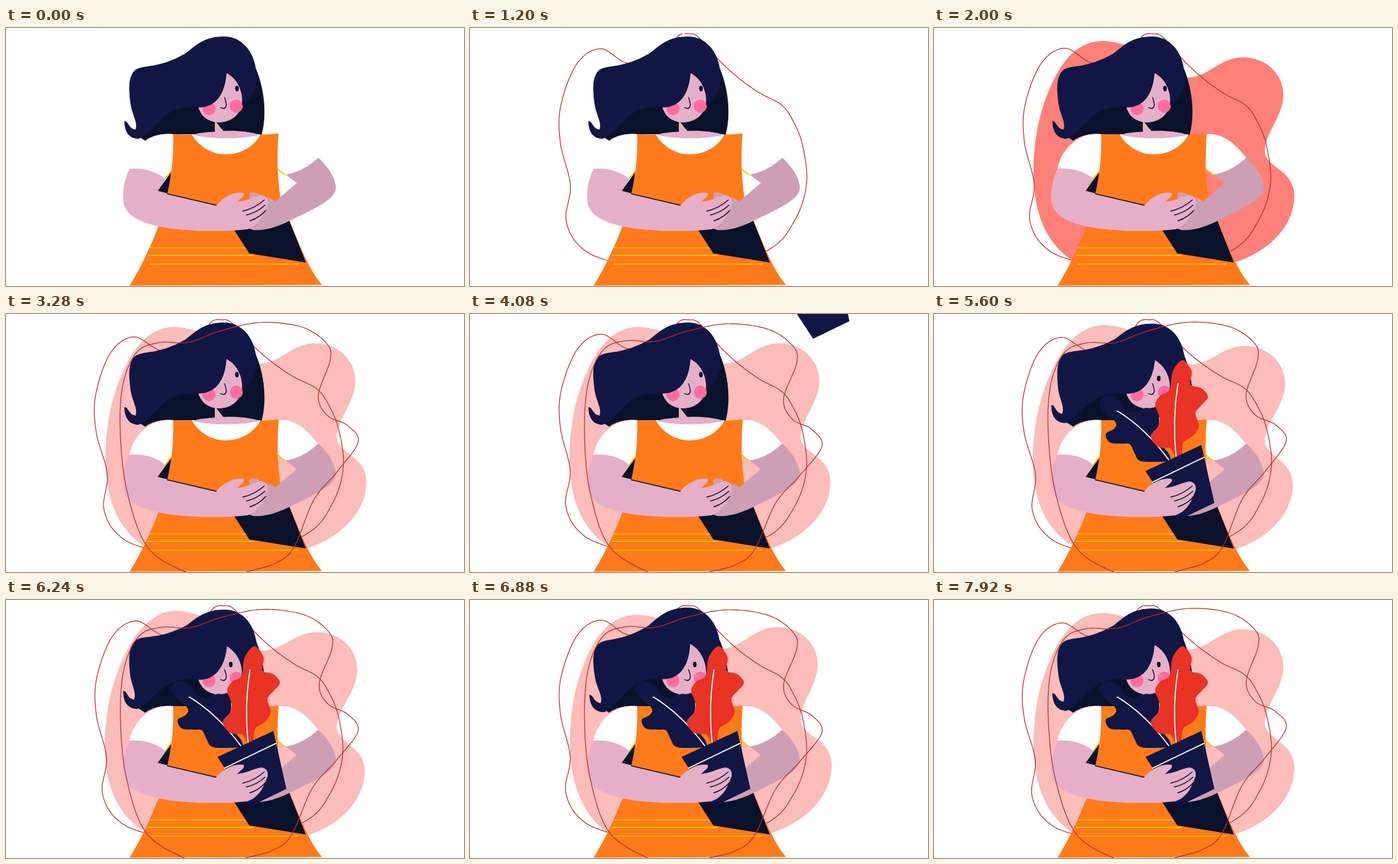
Recreate the animation shown at these times as an HTML page with a canvas. Size 704 px wide and 396 px high, loop 8 s.

```html
<!DOCTYPE html>
<html lang="en">
<head>
<meta charset="utf-8">
<title>Woman with a plant</title>
<style>
html, body { margin: 0; width: 100%; height: 100%; overflow: hidden; background: #fff; }
canvas { display: block; width: 704px; height: 396px; }
</style>
</head>
<body>
<canvas id="stage" width="704" height="396"></canvas>
<script>
const ctx = document.getElementById('stage').getContext('2d');
const LOOP = 8000, STEP = 80, TAU = Math.PI * 2;
const NAVY = '#121645', DARK = '#0a112a', ORANGE = '#ff7a1a', YELLOW = '#ffc400';
const SKIN = '#e6afc8', SHADE = '#cd9fb4', PINK = '#ff6b9f', RED = '#e83325', LINE = '#b5302a';

// Closed Catmull-Rom curve through a few key points, as a polyline.
function smooth(keys) {
  const pts = keys.split(' ').map(p => p.split(',').map(Number));
  const n = pts.length, out = [];
  for (let i = 0; i < n; i++) {
    const [a, b, c, d] = [-1, 0, 1, 2].map(k => pts[(i + k + n) % n]);
    for (let u = 0; u < 1; u += 1 / 16) {
      out.push([0, 1].map(k => b[k] + u / 2 * (c[k] - a[k]
        + u * (2 * a[k] - 5 * b[k] + 4 * c[k] - d[k] + u * (3 * (b[k] - c[k]) + d[k] - a[k])))));
    }
  }
  return [...out, pts[0]];
}

function trace(pts, path = new Path2D()) {
  pts.forEach(([x, y], i) => i ? path.lineTo(x, y) : path.moveTo(x, y));
  return path;
}

const shape = d => new Path2D(d);
const blob = shape('M262 20C226 18 199 45 180 88C160 132 152 180 153 230C155 290 175 332 213 357L300 372L461 360C503 348 553 312 554 258C554 222 520 216 510 197C501 170 537 138 537 103C537 70 510 45 475 45C440 45 425 73 393 76C360 75 330 25 262 20Z');
const outer = smooth('335,385 213,357 167,333 147,293 154,240 139,175 140,118 165,54 202,31 246,54 300,38 321,12 337,9 352,14 383,49 412,76 445,100 478,118 495,140 511,180 517,240 498,297 455,343');
const inner = smooth('320,409 273,396 213,355 184,270 176,180 182,105 205,55 240,41 285,42 335,26 397,15 460,24 497,50 502,76 482,130 495,161 525,177 541,203 507,248 470,290 437,362 408,385 368,396');
const redLeaf = trace(smooth('372,223 364,207 345,204 333,188 343,175 347,160 340,140 347,126 362,116 367,88 382,71 396,88 394,108 411,114 421,127 411,140 402,152 407,172 398,187 383,198 380,220'));
const navyLeaf = trace(smooth('254,135 267,125 284,132 296,148 312,149 328,144 344,153 345,172 335,185 341,199 356,208 363,224 338,227 316,225 308,213 301,200 288,199 270,197 264,184 277,176 279,166 262,150'));
const pot = shape('M325 241L411 201L431 290L375 317Z');

const backHair = shape('M203 166L214 173C226 164 240 162 257 163L393 164C401 135 398 95 384 62L300 60L230 130Z');
const face = shape('M339 66C354 77 363 93 363 112C362 131 348 145 326 145C310 144 299 135 295 120L320 85Z');
const hair = shape('M339 69C337 98 325 122 296 122C264 119 250 130 238 141C226 153 214 166 204 170C190 170 182 160 182 143C188 142 188 154 199 156C203 146 195 135 192 120C188 92 188 75 198 65C212 55 232 64 276 39C291 27 305 13 335 13C362 13 380 35 384 62C389 88 380 106 363 117C365 96 356 79 339 69Z');
const neck = shape('M321 140V159C308 160 296 161 287 164C315 171 361 171 391 164C374 159 354 157 334 158L322 143Z');
const shirt = shape('M286 163H391L380 196H300Z');
const sleeveL = shape('M258 163C220 158 194 190 190 216C215 214 234 222 245 232L256 220Z');
const sleeveR = shape('M419 163C446 160 465 181 480 199C465 213 449 222 430 225L417 215Z');
const torso = shape('M257 163L286 164C298 184 318 194 338 194C361 194 381 182 391 164L419 162C416 195 417 230 422 261L385 290L323 272L248 254C254 228 258 200 257 163Z');
const skirt = shape('M236 300C223 335 207 368 190 395.500L486 394.500C470 376 459 353 436 296Z');
const armR = shape('M480 199C495 212 507 231 507 246C506 262 479 275 450 289C425 302 402 312 380 310L366 305L376 270C374 262 374 256 375 253C380 251 388 254 395 258C402 259 410 264 414 266L447 238L430 225C449 222 466 212 480 199Z');
const armL = shape('M190 216C215 214 234 222 245 232L233 250L323 272C334 259 352 250 365 253C369 257 360 262 355 267C369 266 383 258 393 257C402 258 405 267 400 276C394 292 386 304 371 309C338 313 270 313 232 304C195 295 180 282 180 260C180 242 184 228 190 216Z');
const fingers = shape('M364 281Q382 277 397 264M370 287Q386 283 398 272M375 296Q390 291 399 280');

const ease = (t, from, to) => {
  const x = Math.max(0, Math.min(1, (t - from) / (to - from)));
  return x * x * (3 - 2 * x);
};

function fill(path, color) {
  ctx.fillStyle = color;
  ctx.fill(path);
}

function stroke(path, color, width) {
  ctx.strokeStyle = color;
  ctx.lineWidth = width;
  ctx.stroke(path);
}

function oval(x, y, rx, ry, color) {
  const path = new Path2D();
  path.ellipse(x, y, rx, ry, 0, 0, TAU);
  fill(path, color);
}

function turn(angle, x, y, scale, draw) {
  ctx.save();
  ctx.translate(x, y);
  ctx.rotate(angle);
  ctx.scale(scale, scale);
  ctx.translate(-x, -y);
  draw();
  ctx.restore();
}

// The loop grows from its bottom along both sides.
function drawLoop(pts, angle, progress) {
  if (!progress) return;
  const count = Math.ceil(pts.length / 2 * progress) + 1;
  const path = trace(pts.slice(0, count));
  trace(pts.slice(-count), path);
  turn(angle, 330, 190, 1, () => stroke(path, LINE, 1.2));
}

function drawBlob(t, sway) {
  const size = ease(t, 1000, 2000), fade = ease(t, 2000, 2900);
  if (!size) return;
  const mix = (a, b) => Math.round(a + (b - a) * fade);
  const color = `rgb(${mix(254, 251)},${mix(128, 188)},${mix(120, 186)})`;
  turn(sway, 353, 190, size, () => fill(blob, color));
}

function drawBody() {
  fill(shirt, '#fff');
  fill(neck, SKIN);
  fill(sleeveL, '#fff');
  fill(sleeveR, '#fff');
  fill(shape('M254 221L233 250L250 256Z'), DARK);
  fill(skirt, ORANGE);
  stroke(shape('M222 337.500H370M221 362.500H449'), YELLOW, 1.3);
  stroke(shape('M219 349H380'), YELLOW, 2);
  fill(shape('M348 306L374 346L461 360L434 292Z'), DARK);
  fill(torso, ORANGE);
  stroke(shape('M254 219L245 231M417 214Q422 222 429 225'), YELLOW, 1.8);
  fill(armR, SHADE);
}

function drawHead(t, sway) {
  const look = ease(t, 4600, 5300);
  fill(face, SKIN);
  oval(312, 124, 10, 10, PINK);
  oval(354, 120, 10, 10, PINK);
  oval(355 - 9.5 * look, 93 + 6 * look, 2.8, 4.2, DARK);
  stroke(shape('M336 107C339 115 339 119 338 121C336 124 333 124 330 122'), DARK, 1.4);
  turn(sway, 283, 91, 1, () => fill(hair, NAVY));
}

function drawPlant(t) {
  const lift = 326 * (1 - ease(t, 3700, 5290));
  ctx.save();
  ctx.translate(lift * .546, -lift);
  fill(navyLeaf, NAVY);
  stroke(shape('M282 149Q325 175 361 224'), '#fff', 1.7);
  fill(redLeaf, RED);
  stroke(shape('M375 107Q366 163 372 219'), '#fff', 1.7);
  fill(pot, NAVY);
  stroke(shape('M336 258L415 220'), '#fff', 1.9);
  ctx.restore();
}

function drawArm() {
  fill(armL, SKIN);
  stroke(shape('M248 254.500L323 272'), DARK, 1.4);
  stroke(fingers, DARK, 1.4);
}

function render(t) {
  const wave = (1 + Math.cos((t - 5600) / 2550 * TAU)) / 2;
  const tilt = -.037 * wave * wave;
  const sway = t > 5280 ? .046 * Math.sin((t - 5280) / 2640 * TAU) : 0;
  ctx.fillStyle = '#fff';
  ctx.fillRect(0, 0, 704, 396);
  ctx.lineCap = ctx.lineJoin = 'round';
  drawBlob(t, sway);
  drawLoop(outer, tilt, ease(t, 0, 1300));
  fill(backHair, DARK);
  drawBody();
  drawHead(t, sway);
  if (t > 3700) drawPlant(t);
  drawArm();
  drawLoop(inner, tilt, ease(t, 2000, 2900));
}

const start = performance.now();
function tick() {
  const t = (performance.now() - start) % LOOP;
  render(Math.floor(t / STEP) * STEP);
  requestAnimationFrame(tick);
}
tick();
</script>
</body>
</html>
```
